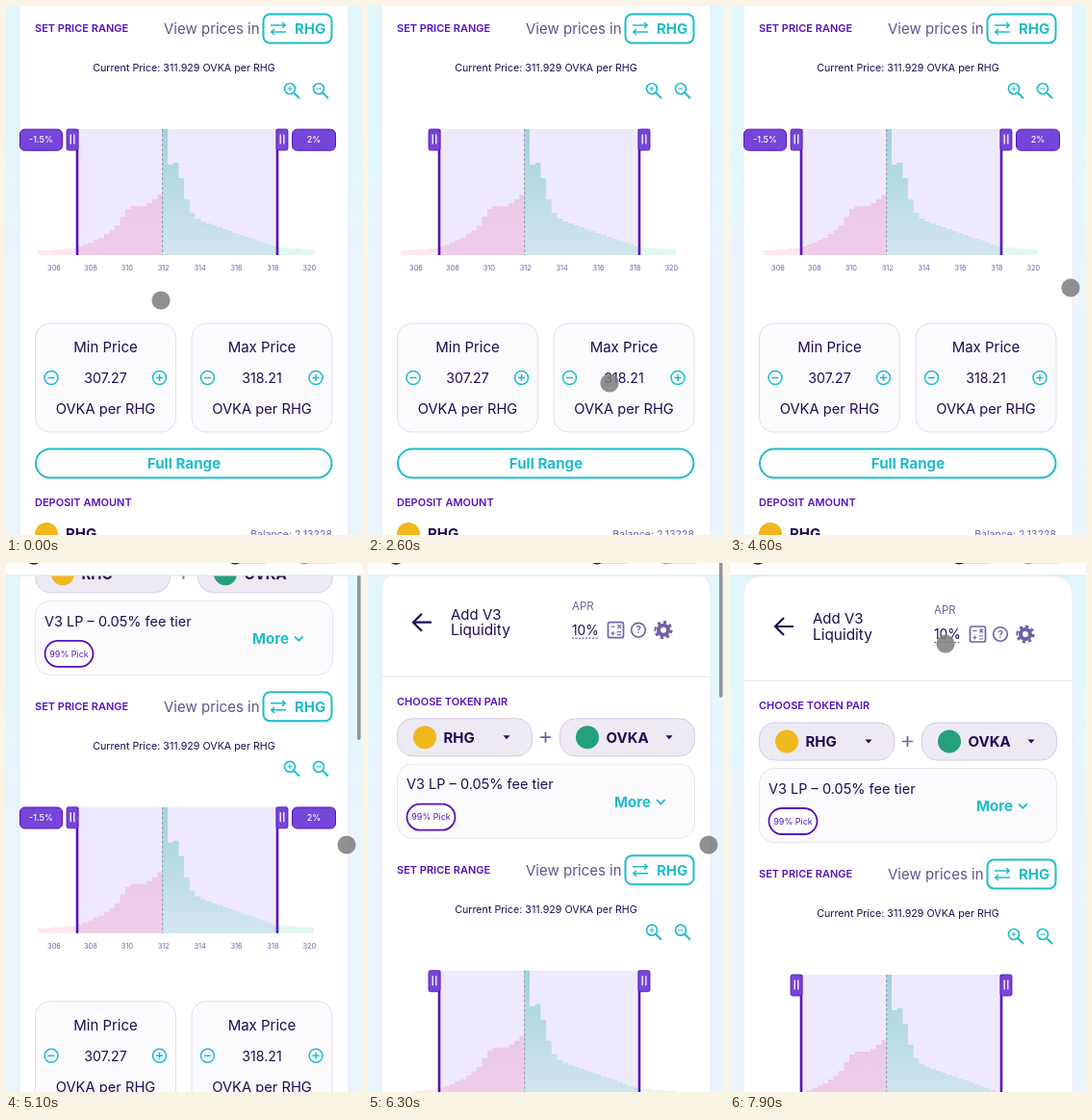
Animation of 370x550 px, one loop 8 s. Source, as an HTML page:

```html
<!DOCTYPE html>
<html lang="en">
<head>
<meta charset="utf-8">
<style>
html, body { margin: 0; width: 100%; height: 100%; overflow: hidden; background: #e6f6fc; }
svg { display: block; width: 370px; height: 550px; font-family: Inter, Roboto, sans-serif; }
</style>
</head>
<body>
<svg id="stage" viewBox="0 0 370 550"></svg>
<script>
const INK = '#200b52', VIOLET = '#7645d9', DEEP = '#5611bd', TEAL = '#1fbccb', MUTED = '#7061a6';
const YELLOW = '#f0b81c', GREEN = '#24a17b', PANEL = '#fbfafd';
const COIN = 'RHG', CASH = 'OVKA', RATE = `${CASH} per ${COIN}`;

// y is the middle of the capital letters
const text = (x, y, size, str, fill = INK, weight = 400, anchor = 'start') =>
  `<text x="${x}" y="${y + size * .36}" font-size="${size}" fill="${fill}" font-weight="${weight}" text-anchor="${anchor}">${str}</text>`;
const centred = (x, y, size, str, fill = INK, weight = 400) => text(x, y, size, str, fill, weight, 'middle');
const heading = (y, str) => text(30, y, 11, str, DEEP, 600);
const box = (x, y, w, h, r, fill, stroke = 'none', sw = 1) =>
  `<rect x="${x}" y="${y}" width="${w}" height="${h}" rx="${r}" fill="${fill}" stroke="${stroke}" stroke-width="${sw}"/>`;
const line = (d, stroke, sw = 1.5, dash = 'none') =>
  `<path d="${d}" fill="none" stroke="${stroke}" stroke-width="${sw}" stroke-dasharray="${dash}"/>`;
const dot = (x, y, r, fill, stroke = 'none', sw = 1.5) =>
  `<circle cx="${x}" cy="${y}" r="${r}" fill="${fill}" stroke="${stroke}" stroke-width="${sw}"/>`;
const cross = (x, y, r, color, sw, plus) =>
  line(`M${x - r} ${y}h${2 * r}` + (plus ? `M${x} ${y - r}v${2 * r}` : ''), color, sw);
const fade = (id, from, to) => `<linearGradient id="${id}" gradientUnits="userSpaceOnUse" x1="0" x2="0" y1="128" y2="259">
  <stop stop-color="${from}"/><stop offset="1" stop-color="${to}"/></linearGradient>`;

const roundButton = (x, y, plus) => dot(x, y, 7, 'none', TEAL) + cross(x, y, 3.5, TEAL, 1.5, plus);
const zoom = (x, plus) => dot(x - 2, 86, 5.5, 'none', TEAL, 1.7) +
  line(`M${x + 2} 90l6 6`, TEAL, 2) + cross(x - 2, 86, 2.5, TEAL, 1.1, plus);

const pill = (x, name, color) => box(x, 166, 140, 39, 16, '#eeeaf4', '#d7caec') +
  dot(x + 28.5, 185.5, 12, color) + text(x + 48, 185.5, 15, name, INK, 700) +
  `<path d="M${x + 110} 183.5h7l-3.5 4z" fill="${INK}"/>`;

const priceBox = (x, title, value) => box(x, 330, 146, 113, 15, PANEL, '#e4ddee') +
  centred(x + 73, 355, 15, title) + centred(x + 73, 387, 14.2, value) + centred(x + 73, 419, 14.7, RATE) +
  roundButton(x + 16.5, 386.5) + roundButton(x + 129, 386.5, true);

// n steps from x0 to x1; height takes the progress from 0 to 1
const bars = (x0, x1, n, fill, height) => {
  const w = (x1 - x0) / n;
  let d = `M${x0} 259`;
  for (let i = 0; i < n; i++) d += `V${259 - Math.round(height((i + .5) / n))}h${w}`;
  return `<path d="${d}V259Z" fill="${fill}"/>`;
};
const bump = (u, mid, width) => Math.exp(-(((u - mid) / width) ** 2));

const grip = (x, edge) => line(`M${edge} 128V259`, DEEP, 2.6) + box(x, 128, 12, 22, 2, VIOLET, DEEP, .8) +
  line(`M${x + 4.2} 133.5v10M${x + 7.8} 133.5v10`, '#fff', 1.3);
const badge = (x, w, str) => box(x, 128.2, w, 22, 5, VIOLET, DEEP) + centred(x + w / 2, 139, 9, str, '#fff', 500);

const chart = box(74, 128, 208, 131, 0, '#efe9fc') +
  bars(34, 74, 3, '#fde8f1', u => 5 + 2 * u) +
  bars(74, 163, 16, 'url(#pink)', u => 9 + 56 * u ** 1.4 + 12 * bump(u, .62, .13)) +
  bars(168, 282, 20, 'url(#teal)', u => 8 + 40 * (1 - u) + 52 * bump(u, .06, .11)) +
  bars(282, 320, 3, '#e2f8ef', u => 8 - 2 * u) +
  box(162.5, 128, 5.5, 131, 0, 'url(#teal)') +
  line('M162.7 128V259', '#8796b8', 1, '3 2') +
  grip(63, 74) + grip(281, 282) +
  Array.from({ length: 8 }, (_, i) => centred(50 + i * 37.9, 272.5, 7.4, 306 + 2 * i, MUTED)).join('');

const gear = `<circle cx="307" cy="74" r="7.8" fill="none" stroke="${MUTED}" stroke-width="3.6" pathLength="16" stroke-dasharray="1"/>` +
  dot(307, 74, 5, '#fff', MUTED, 4);
const calculator = box(249.5, 66, 16, 16, 2, 'none', MUTED, 1.7) +
  cross(254.5, 70.5, 2, MUTED, 1.2) + cross(254.5, 77.5, 2, MUTED, 1.2, true) +
  line('M259.5 68.5l3.5 4M263 68.5l-3.5 4M259 76h4M259 79h4', MUTED, 1.2);

const upper = line('M66 66H48M56 57l-9 9 9 9', INK, 2.2) +
  text(86, 58, 15, 'Add V3') + text(86, 74, 15.4, 'Liquidity') +
  text(212, 49, 11.5, 'APR', MUTED) + text(212, 74.5, 13.8, '10%') +
  line('M212 82.5h27', MUTED, 1.2, '2 1.5') +
  calculator + dot(281, 74, 7.3, 'none', MUTED, 1.6) + centred(281, 74, 10.5, '?', MUTED, 600) + gear +
  line('M14 122.5H356', '#e6e4ec', 1) +
  heading(148.5, 'CHOOSE TOKEN PAIR') +
  pill(30.5, COIN, YELLOW) + pill(199.5, CASH, GREEN) + cross(184.5, 185.5, 5.5, MUTED, 1.7, true) +
  box(30.5, 213.5, 309, 77, 15, PANEL, '#e9e4f0') +
  text(40, 234.5, 14.5, 'V3 LP – 0.05% fee tier') +
  box(40.5, 255, 50, 27, 13.5, '#fff', DEEP, 1.8) + centred(65.5, 268.5, 9, '99% Pick', DEEP) +
  text(256, 252.5, 15, 'More', TEAL, 700) + line('M300 250.5l4.3 4.3 4.3-4.3', TEAL, 1.8);

const lower = heading(23, 'SET PRICE RANGE') + text(164, 23.5, 15, 'View prices in', '#62528f') +
  box(267.5, 8.5, 71, 30, 7, '#fff', TEAL, 2) +
  line('M275 20h15M287 17l3.3 3-3.3 3M291 27h-15M279 24l-3.3 3 3.3 3', TEAL) +
  text(300, 23.5, 15, COIN, TEAL, 700) +
  centred(185, 64, 10.7, `Current Price: 311.929 ${RATE}`) +
  zoom(297, true) + zoom(327) + chart +
  `<g id="badges">${badge(14.5, 44, '-1.5%')}${badge(297.5, 45, '2%')}</g>` +
  priceBox(30.5, 'Min Price', '307.27') + priceBox(193, 'Max Price', '318.21') +
  box(31, 460.5, 307.5, 30, 15, '#fff', TEAL, 2) + centred(185, 475.5, 15.2, 'Full Range', TEAL, 700) +
  heading(516.5, 'DEPOSIT AMOUNT') +
  dot(42, 549, 12, YELLOW) + text(62, 549, 15, COIN, INK, 700) +
  text(339, 549, 10.6, 'Balance: 2.13228', MUTED, 400, 'end');

const toggle = (x, track, knob) => box(x, -18, 46, 19, 9, track) + dot(x + 8, -7, 8.5, knob);
const header = box(0, -20, 370, 33, 0, '#fff') + line('M0 13H370', '#e3e2e8', 1) +
  dot(29, -7, 8.7, '#5a1520') + toggle(230, '#dcdce0', '#222') + toggle(302, '#e6e2ea', '#ee7fc8');

document.getElementById('stage').innerHTML = `<defs>
  ${fade('sky', '#e2f7fc', '#e9f4fd')}${fade('pink', '#e6c6e4', '#efcde8')}${fade('teal', '#a2d3da', '#d2e5ef')}</defs>
  ${box(0, 0, 370, 550, 0, 'url(#sky)')}
  <g id="page">${box(14, 13, 342, 1000, 20, '#fff', '#ebe9f2')}${upper}
  <g transform="translate(0 300)">${lower}</g></g>
  <g id="header">${header}</g>
  <rect id="thumb" x="365" width="3.6" height="171" rx="1.8" fill="#92959b"/>
  <circle id="pointer" r="9.6" fill="#777" fill-opacity=".82"/>`;

const [page, head, thumb, pointer, badges] =
  ['page', 'header', 'thumb', 'pointer', 'badges'].map(id => document.getElementById(id));

const progress = (t, from, to) => Math.min(1, Math.max(0, (t - from) / (to - from)));
const smooth = p => p * p * (3 - 2 * p);
const appear = (t, from) => progress(t, from, from + 250);

// Pointer legs: start time, end time, destination
const LEGS = [[900, 1500, 120, 384], [2000, 2500, 251, 392], [3400, 4100, 354, 293], [6700, 7400, 224, 84]];

function draw(now) {
  const t = Math.floor(now % 8000 / 100) * 100;
  const scroll = 300 * (1 - (1 - progress(t, 4700, 6600)) ** 2.3);
  let x = 161, y = 306;
  for (const [from, to, toX, toY] of LEGS) {
    const p = smooth(progress(t, from, to));
    x += (toX - x) * p;
    y += (toY - y) * p;
  }
  pointer.setAttribute('transform', `translate(${x} ${y})`);
  page.setAttribute('transform', `translate(0 ${scroll - 300})`);
  head.setAttribute('transform', `translate(0 ${Math.min(0, scroll / 4 - 15)})`);
  thumb.setAttribute('y', 13 - .26 * (scroll - 126));
  thumb.setAttribute('opacity', appear(t, 4700) - appear(t, 6700));
  badges.setAttribute('opacity', 1 - appear(t, 1500) + appear(t, 3700) - appear(t, 5500));
}

const start = performance.now();
(function loop() {
  draw(performance.now() - start);
  requestAnimationFrame(loop);
})();
</script>
</body>
</html>
```
